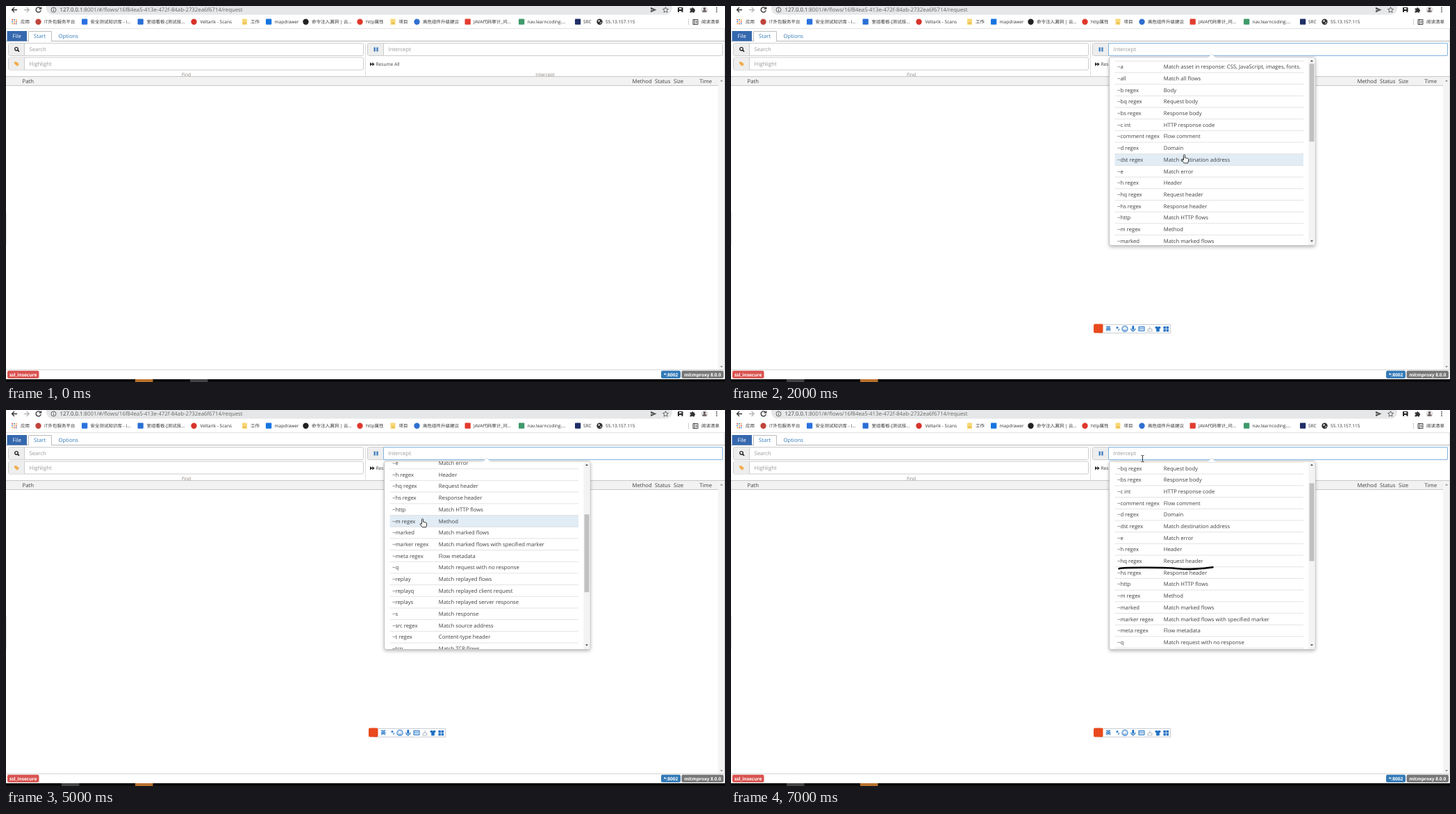
An HTML page for the animation above (8000 ms loop, 1035 px wide and 541 px high).

```html
<!DOCTYPE html>
<html lang="zh-CN">
<head>
<meta charset="utf-8">
<title>Intercept filter help</title>
<style>
html, body { margin: 0; height: 100%; overflow: hidden; background: #fff; }
svg { display: block; width: 1035px; height: 541px; text-rendering: geometricPrecision; }
text { font: 7.72px 'Open Sans', 'Noto Sans CJK SC', 'Noto Sans CJK', sans-serif; fill: #404040; }
.url { font-size: 7.8px; }
.mark { font-size: 6.5px; fill: #333; }
.small { font-size: 6.6px; }
.caption { font-size: 6.5px; fill: #857b74; text-anchor: middle; }
.badge { font-size: 6.6px; font-weight: 700; fill: #fff; text-anchor: middle; }
.hint { fill: #999; }
.link { fill: #337ab7; }
.line { fill: none; stroke: #333; }
</style>
</head>
<body>
<svg viewBox="0 0 1035 541">
  <!-- address bar -->
  <rect x="58" y="-10" width="901" height="22.5" rx="9" fill="#e6e7e8"/>
  <g class="line" stroke-width="1.3">
    <path d="M16 5.5H8.5M12 2 8.5 5.5 12 9"/>
    <path d="M26 5.5H33M29.7 2 33.2 5.5 29.7 9" stroke="#b5b5b5"/>
    <path d="M49.5 3A3.6 3.6 0 1 0 50.3 6.2M50.6 1.5V4.2H47.6"/>
    <g stroke="#555" stroke-width=".9"><circle cx="68.5" cy="5.5" r="3.5"/><path d="M68.5 5V7.6M68.5 3.3V4.2"/></g>
    <path d="m949.5 1.600 1.200 2.600 2.800.3-2.100 1.900.6 2.800-2.500-1.400-2.500 1.400.6-2.800-2.100-1.900 2.800-.3z" stroke="#555" stroke-width=".9"/>
  </g>
  <path d="M928 1.800 936.500 5.500 928 9.200V6.300L932.500 5.500 928 4.700Z" fill="#555"/>
  <rect x="967" y="2" width="7.500" height="7" rx="1" fill="#222"/>
  <path d="M969 3h3.500v2H969zM969 7h3.500v2H969z" fill="#fff"/>
  <path d="M984.500 3.500H987a1.200 1.200 0 0 1 2.400 0H991V5.300a1.200 1.200 0 0 1 0 2.400V9.500H988.900a1.200 1.200 0 0 0-2.300 0H984.500V7.400a1.100 1.100 0 0 0 0-2.200Z" fill="#333"/>
  <circle cx="1005.500" cy="5.500" r="5" fill="#dedede"/>
  <path d="M1002.300 8.600q0-2.500 3.200-2.500t3.200 2.500z" fill="#5b4e50"/><circle cx="1005.500" cy="4" r="1.700" fill="#5b4e50"/>
  <path d="M1023 2v1.500M1023 4.800v1.500M1023 7.600v1.500" stroke="#333" stroke-width="1.500"/>
  <text class="url" x="77.500" y="8.200">127.0.0.1<tspan fill="#666">:8001/#/flows/16f84ea5-413e-472f-84ab-2732ea6f6714/request</tspan></text>

  <!-- bookmarks -->
  <g id="marks"></g>
  <path d="M982.500 18.500V27" stroke="#ccc"/>
  <path class="line" stroke-width=".9" d="M989 19.500h7v7h-7zM991 19.500v7M992.500 22h2.500M992.500 24h2.500"/>
  <path d="M0 32.500H1035" stroke="#e2e2e2"/>

  <!-- tabs -->
  <path d="M0 50.500H1035" stroke="#b5b5b5"/>
  <rect x="1.500" y="36" width="28.500" height="14.500" fill="#3568ae"/>
  <path d="M32.500 51V36.500H65.500V51" fill="#fff" stroke="#bdbdbd"/>
  <path d="M33 50.500H65" stroke="#fff"/>
  <text x="9.500" y="46.200" style="fill:#fff">File</text>
  <text class="link" x="40" y="46.200">Start</text>
  <text class="link" x="75.500" y="46.200">Options</text>

  <!-- filter fields -->
  <g id="fields"></g>
  <circle cx="15" cy="61.800" r="2.300" fill="none" stroke="#111" stroke-width="1.200"/>
  <path d="m16.700 63.500 2.300 2.300" stroke="#111" stroke-width="1.500"/>
  <path d="M12 80.300h3.200l3.800 3.500-2.900 3-4.100-3.700z" fill="#f0ad4e"/>
  <path d="M529.500 59.500h2.300v6h-2.300zM533.300 59.500h2.300v6h-2.300z" fill="#3f7cc0"/>
  <path d="M517.500 53V101" stroke="#e0e0e0"/>
  <path d="m524 81 3.300 2.700L524 86.400zM527.300 81l3.300 2.700-3.300 2.700z" fill="#222"/>
  <text class="small" x="532.500" y="86.200">Resume All</text>
  <text class="caption" x="259.500" y="100.500">Find</text>
  <text class="caption" x="776" y="100.500">Intercept</text>

  <!-- flow table -->
  <rect y="102" width="1025" height="13" fill="#f2f2f2"/>
  <path d="M0 101.500H1035M0 114.500H1025" stroke="#c8c8c8"/>
  <text x="23.500" y="110.700">Path</text>
  <text x="901.500" y="110.700">Method</text>
  <text x="934" y="110.700">Status</text>
  <text x="961" y="110.700">Size</text>
  <text x="998.300" y="110.700">Time</text>
  <rect x="1025" y="102" width="10" height="422" fill="#f4f4f4"/>
  <path d="m1028 108.500 2-2.200 2 2.200zM1028 518l2 2.200 2-2.200z" fill="#888"/>
  <path d="M.3 297V344" stroke="#ccc" stroke-width=".6"/>
  <path d="M1034.700 33V537" stroke="#aaa" stroke-width=".6"/>

  <!-- footer -->
  <path d="M0 523.500H1035" stroke="#d5d5d5"/>
  <rect x="2" y="524.700" width="45.500" height="11" rx="2" fill="#d9534f"/>
  <rect x="943" y="524.700" width="28" height="11" rx="2" fill="#337ab7"/>
  <rect x="972.500" y="524.700" width="60.500" height="11" rx="2" fill="#777"/>
  <text class="badge" x="24.700" y="532.500">ssl_insecure</text>
  <text class="badge" x="957" y="532.500">*:8002</text>
  <text class="badge" x="1002.700" y="532.500">mitmproxy 8.0.0</text>
  <rect y="537" width="1035" height="4" fill="#0b0b0b"/>
  <rect x="186" y="537" width="25.500" height="4" fill="#b9722f"/>
  <rect id="task" y="537" width="25.500" height="4" fill="#444"/>

  <!-- input method bar -->
  <g id="ime">
    <rect x="530.500" y="458.500" width="102" height="12" fill="#fff" stroke="#c9ced4"/>
    <rect x="522" y="457.500" width="13.500" height="13" rx="2" fill="#e8491d"/>
    <g fill="none" stroke="#1c6fc4" stroke-width="1.100">
      <circle cx="556" cy="462.700" r="1"/><path d="M558.500 464.500q.5 1.500-1 2.500"/>
      <circle cx="567" cy="464.500" r="4"/><path d="M564.800 465.500q2.200 2.500 4.400 0M565.500 462.500v1M568.500 462.500v1"/>
      <path d="M575.800 464q0 3.300 3 3.300t3-3.300M578.800 467.300v1.700"/>
      <path d="M578.800 461.500v3" stroke-width="2.800" stroke-linecap="round"/>
      <rect x="587" y="461.500" width="8" height="6" rx=".5"/><path d="M588 463.500h6M588 465.300h6" stroke-dasharray="1.200 .6"/>
      <path d="M603 461v4M600 465.500q3-2.500 6 0v2.500h-6z" stroke="#b5bcc4"/>
    </g>
    <path d="m612.300 460.800 1.200.7h2l1.200-.7 2.200 1.700-1.300 1.800-.8-.4v4.600h-4.600v-4.600l-.8.400-1.300-1.800zM622.500 461h3.400v3.400h-3.400zM622.500 465.200h3.400v3.400h-3.400zM626.700 465.200h3.400v3.400h-3.400zM626.700 461h3.400v3.400h-3.400z" fill="#1c6fc4"/>
    <text x="539.300" y="467.400" style="fill:#1c6fc4;font-weight:700">英</text>
  </g>

  <!-- filter help -->
  <g id="help">
    <rect x="543.500" y="53.500" width="488" height="18" rx="1.500" fill="none" stroke="#7fb4e2"/>
    <rect x="544.500" y="73.500" width="296.500" height="271" rx="2.500" fill="#fff" stroke="#c4c4c4" style="filter:drop-shadow(0 2px 2.500px #0004)"/>
    <path d="m687 74 5-5 5 5" fill="#fff" stroke="#d4d4d4" stroke-width=".7"/>
    <path d="M687 74h10" stroke="#fff"/>
    <clipPath id="view"><rect x="545" y="74" width="286" height="270"/></clipPath>
    <g clip-path="url(#view)"><g id="list"><rect id="hover" x="552.500" width="271.500" height="16.700" fill="#e1ecf5"/></g></g>
    <rect x="831.500" y="74.500" width="9" height="269.500" fill="#f3f3f3"/>
    <rect id="thumb" x="832.500" y="83" width="7" height="112" fill="#c1c1c1"/>
    <path d="m834 80 2-2.300 2 2.300zM834 337.300l2 2.300 2-2.300z" fill="#444"/>
  </g>
  <path id="ink" d="M558.500 228.200C566 226.600 580 226.800 600 226.800S632 227 644 228.300 678 228.600 693.500 226.200" fill="none" stroke="#000" stroke-width="2.600" stroke-linecap="round"/>

  <!-- pointers -->
  <path id="hand" d="M-1 1Q0-.6 1 1V5L5 5.800Q6.500 6.200 6.200 8L5.300 12.500H-.3L-3.600 8.300Q-3.600 6.700-1 8.200Z" fill="#fff" stroke="#222" stroke-width=".9"/>
  <path id="beam" d="M-2-4.700Q0-4.700 0-3.500 0-4.700 2-4.700M0-3.500V3.500M-2 4.700Q0 4.700 0 3.500 0 4.700 2 4.700" fill="none" stroke="#222" stroke-width=".9"/>
</svg>
<script>
const $ = id => document.getElementById(id);
const add = (id, markup) => $(id).insertAdjacentHTML('beforeend', markup);

// icon centre, icon kind, colour, label position, label
const bookmarks = [
  [12, 'apps', '', 21, '应用'],
  [46.5, 'disc', '#c0453c', 55, 'IT外包服务平台'],
  [113, 'box', '#2a72e0', 121.5, '安全测试知识库 - I...'],
  [193.5, 'box', '#2a6fd6', 202.5, '室组看板-[测试技...'],
  [270.5, 'disc', '#d8332b', 279.5, 'Veltarik - Scans'],
  [343.5, 'folder', '', 352, '工作'],
  [378, 'box', '#1675e0', 386.5, 'mapdrawer'],
  [431.5, 'disc', '#222', 440, '命令注入漏洞 | 云...'],
  [509.5, 'disc', '#e0382c', 518, 'http属性'],
  [557, 'folder', '', 565.5, '项目'],
  [591.5, 'disc', '#2f6fd0', 600, '高危组件升级建议'],
  [664.5, 'box', '#e23b2e', 673, 'JAVA代码审计_问...'],
  [742, 'box', '#3f9a6a', 750.5, 'nav.learncoding....'],
  [823, 'box', '#1f2f66', 831, 'SRC'],
  [854.5, 'globe', '', 863, '55.13.157.115'],
  [0, '', '', 1001, '阅读清单'],
];
const dots = ['#e04a3a', '#4285c8', '#e8a83a'];
const icons = {
  disc: (x, c) => `<circle cx="${x}" cy="22.7" r="4.2" fill="${c}"/>`,
  box: (x, c) => `<rect x="${x - 4}" y="18.5" width="8.3" height="8.3" rx="1" fill="${c}"/>`,
  folder: x => `<rect x="${x - 3.5}" y="18.5" width="7" height="8.5" rx=".7" fill="#f8d775"/><path d="M${x - 2} 24.5h4" stroke="#d9aa3a"/>`,
  globe: x => `<circle cx="${x}" cy="22.7" r="4.2" fill="#333"/><path d="M${x - 2.5} 21.5l2-1.5 1 1.5-1.5 1.5zM${x} 24.5l2.5-1.5-.5 2z" fill="#fff"/>`,
  apps: x => [...Array(9).keys()].map(i =>
    `<rect x="${x - 3.7 + i % 3 * 2.8}" y="${19 + (i / 3 | 0) * 2.8}" width="1.7" height="1.7" fill="${dots[(i + (i / 3 | 0)) % 3]}"/>`).join(''),
};
for (const [x, kind, color, textX, label] of bookmarks)
  add('marks', (kind && icons[kind](x, color)) + `<text class="mark" x="${textX}" y="25.3">${label}</text>`);

for (const [x, y, label] of [[3.5, 53.5, 'Search'], [3.5, 74, 'Highlight'], [520.5, 53.5, 'Intercept']])
  add('fields', `<rect x="${x}" y="${y}" width="511" height="18" rx="2" fill="#fff" stroke="#ccc"/>
    <path d="M${x + .5} ${y + .5}h22.5v17h-22.5z" fill="#eee"/><path d="M${x + 23} ${y}v18" stroke="#ccc"/>
    <text class="hint" x="${x + 30}" y="${y + 11.5}">${label}</text>`);

const ROW = 16.69, TOP = 79.2, SCROLL = 53.8;
const filters = `a|Match asset in response: CSS, JavaScript, images, fonts.
all|Match all flows
b regex|Body
bq regex|Request body
bs regex|Response body
c int|HTTP response code
comment regex|Flow comment
d regex|Domain
dst regex|Match destination address
e|Match error
h regex|Header
hq regex|Request header
hs regex|Response header
http|Match HTTP flows
m regex|Method
marked|Match marked flows
marker regex|Match marked flows with specified marker
meta regex|Flow metadata
q|Match request with no response
replay|Match replayed flows
replayq|Match replayed client request
replays|Match replayed server response
s|Match response
src regex|Match source address
t regex|Content-type header
tcp|Match TCP flows`.split('\n');
filters.forEach((filter, i) => {
  const [name, about] = filter.split('|'), y = TOP + i * ROW;
  add('list', `<path d="M552.5 ${y}H824" stroke="#e0e0e0" stroke-width=".9"/>
    <text x="556" y="${y + 11.1}">~${name}</text><text x="622.8" y="${y + 11.1}">${about}</text>`);
});

// help: scroll steps, hover: row under the hand
const states = [
  { at: 0 },
  { at: 1000, ime: 1, beam: [592, 56] },
  { at: 2000, ime: 1, help: 0, hover: 8, hand: [652.5, 213.5] },
  { at: 2990, ime: 1, help: 3, hover: 18, hand: [599.5, 218] },
  { at: 3980, ime: 1, help: 3, hover: 18, hand: [599.5, 210.5] },
  { at: 5000, ime: 1, help: 3, hover: 14, hand: [599.5, 156] },
  { at: 6000, ime: 1, help: 1, hover: 5, hand: [602.5, 113] },
  { at: 7000, ime: 1, help: 1, ink: 1, beam: [592.5, 70] },
];
const show = (id, on) => $(id).style.display = on ? '' : 'none';
const place = (id, pos) => {
  show(id, pos);
  if (pos) $(id).setAttribute('transform', `translate(${pos})`);
};

let current;
function draw(now) {
  requestAnimationFrame(draw);
  const time = now % 8000;
  const state = states.findLast(s => s.at <= time);
  if (state === current) return;
  current = state;
  const { help, hover, ime, ink, hand, beam } = state;
  const open = help !== undefined;
  show('ime', ime);
  show('ink', ink);
  show('help', open);
  show('hover', hover);
  place('hand', hand);
  place('beam', beam);
  $('task').setAttribute('x', open ? 80 : 265);
  if (open) {
    place('list', [0, -help * SCROLL]);
    place('thumb', [0, help * 22.4]);
  }
  if (hover) $('hover').setAttribute('y', TOP + hover * ROW);
}
draw(performance.now());
</script>
</body>
</html>
```
